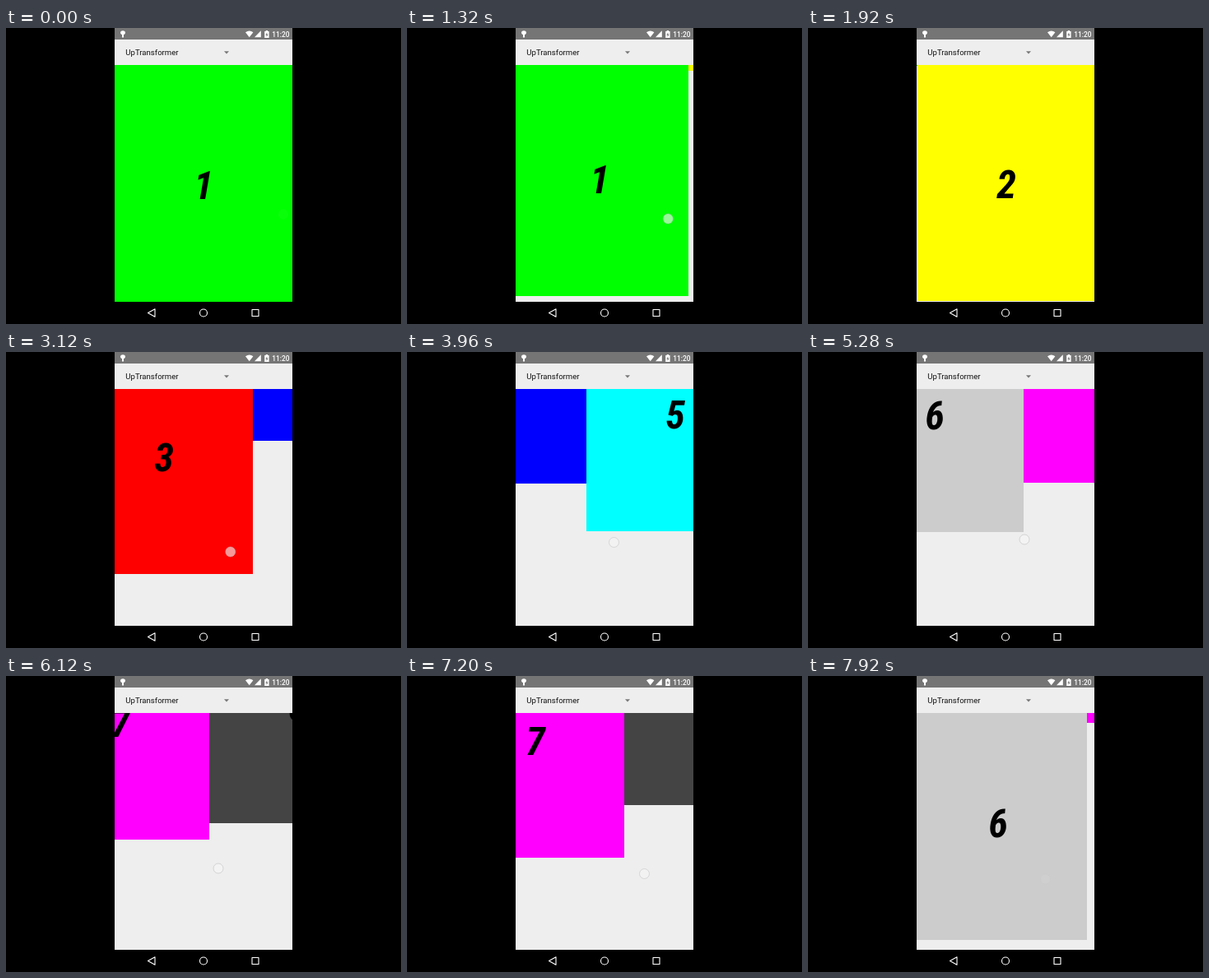
An HTML page for the animation above (8000 ms loop, 480 px wide and 360 px high).

```html
<!DOCTYPE html>
<html lang="en">
<head>
<meta charset="utf-8">
<title>Page transformer</title>
<style>
  html, body { margin: 0; width: 100%; height: 100%; overflow: hidden; background: #000; }
  svg { display: block; width: 480px; height: 360px; font-family: Roboto, sans-serif; }
  .digit {
    font: italic 700 48px "Roboto Condensed", Roboto, sans-serif;
    font-stretch: condensed;
    text-anchor: middle;
  }
  .label { font-size: 9.6px; fill: #111; }
  .clock { font-size: 8.4px; font-weight: 500; fill: #fff; }
  .nav { fill: none; stroke: #fff; stroke-width: 1.1; stroke-linejoin: round; }
</style>
</head>
<body>
<svg viewBox="0 0 480 360">
  <defs>
    <clipPath id="pager"><rect x="132" y="45" width="216" height="288"/></clipPath>
  </defs>
  <rect width="480" height="360"/>
  <rect x="132" width="216" height="333" fill="#eee"/>
  <g clip-path="url(#pager)"><g id="pages"></g></g>

  <rect x="132" width="216" height="14" fill="#757575"/>
  <g fill="#fff">
    <path d="M139 5.8a3 2.6 0 0 1 6 0q0 1.4-1.4 2.2h-.6v3.5h-2V8h-.6Q139 7.200 139 5.800z"/>
    <path d="M291 5.300q4.700-3.600 9.400 0L295.700 11.300z"/>
    <path d="M302 11.200h7.800V3.200z"/>
    <path d="M314.200 4h1.500v-1h2.400v1h1.500v8h-5.400z"/>
  </g>
  <path d="M317.300 5.500l-2 3h1.300v2.300l2-3h-1.300z" fill="#757575"/>
  <text class="clock" x="323.300" y="10.500">11:20</text>
  <text class="label" x="145.300" y="33">UpTransformer</text>
  <path d="M265 28.200h6l-3 3.200z" fill="#777"/>

  <g class="nav">
    <path d="M172.500 346.500l8.500-4.700v9.400z"/>
    <circle cx="240" cy="346.500" r="4.500"/>
    <rect x="299" y="342.500" width="8" height="8"/>
  </g>
  <circle id="touch" r="6" fill="#f5f5f5" fill-opacity=".62" stroke="#b8b8bc" stroke-opacity=".5"/>
</svg>
<script>
const LOOP = 8000, WIDTH = 216, HEIGHT = 288, DRAG_MS = 300, DRAG_PX = 75;
const colors = ['#0f0', '#ff0', '#f00', '#00f', '#0ff', '#ccc', '#f0f', '#444'];

// Start time, direction in pages, and the point where the finger lets go.
const swipes = [
  [1270, 1, 255, 232], [2080, 1, 255, 240], [2880, 1, 258, 243],
  [3601, 1, 251.500, 231.500], [4280, 1, 255, 230], [4980, 1, 263, 228],
  [5800, 1, 258, 234], [6837, -1, 288.500, 240.500], [7360, -1, 288.500, 247]
];

// Share of a page travelled after so many ms: drag, then settle.
const travel = [
  [0, 0], [120, .06], [240, .217], [300, .3935], [360, .6],
  [440, .82], [560, .957], [650, .996], [700, 1]
];

const clamp = v => Math.min(1, Math.max(0, v));

function progress(ms) {
  if (ms <= 0) return 0;
  const i = travel.findIndex(([t]) => t >= ms);
  if (i < 0) return 1;
  const [t0, p0] = travel[i - 1], [t1, p1] = travel[i];
  return p0 + (p1 - p0) * (ms - t0) / (t1 - t0);
}

const pagesEl = document.getElementById('pages');
const touch = document.getElementById('touch');

const pages = colors.map((color, i) => {
  const page = document.createElementNS('http://www.w3.org/2000/svg', 'g');
  page.innerHTML = `<rect x="132" y="45" width="${WIDTH}" height="${HEIGHT}" fill="${color}"/>
    <text class="digit" x="240" y="207.500">${i + 1}</text>`;
  return pagesEl.appendChild(page);
});

function placeTouch(x, y, opacity) {
  touch.setAttribute('cx', x);
  touch.setAttribute('cy', y);
  touch.setAttribute('opacity', opacity);
}

function drawTouch(time) {
  const swipe = swipes.findLast(([start]) => time >= start - 60);
  if (!swipe) return placeTouch(337, 226.5, time < 120 ? .06 : 0);
  const [start, dir, x, y] = swipe;
  const ms = time - start;
  const left = 1 - clamp(ms / DRAG_MS);
  placeTouch(x + dir * DRAG_PX * left, y, clamp((590 - ms) / 260));
}

function draw(time) {
  const position = swipes.reduce((sum, [start, dir]) => sum + dir * progress(time - start), 0);
  pages.forEach((page, i) => {
    const offset = i - position;
    const x = Math.round(offset * WIDTH), y = Math.round(-Math.abs(offset) * HEIGHT);
    page.setAttribute('transform', `translate(${x} ${y})`);
    page.setAttribute('display', Math.abs(offset) < 1 ? 'inline' : 'none');
  });
  drawTouch(time);
}

const began = performance.now();
function tick() {
  draw((performance.now() - began) % LOOP);
  requestAnimationFrame(tick);
}
tick();
</script>
</body>
</html>
```
